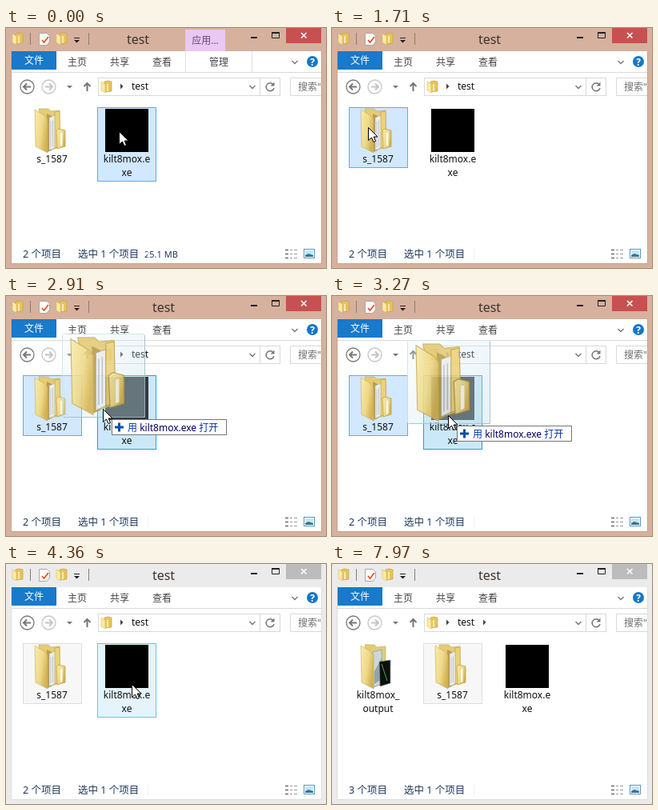
Write an HTML page that moves like this. It is 400 px wide and 300 px high and loops after 8000 ms.

```html
<!DOCTYPE html>
<html lang="zh">
<head>
<meta charset="utf-8">
<title>Drag and drop</title>
<style>
html, body { margin: 0; width: 100%; height: 100%; overflow: hidden; background: #fff; }
svg { display: block; width: 100vw; height: 100vh; }
text { font: 12px "Noto Sans", "Noto Sans CJK SC", "Noto Sans CJK", sans-serif; fill: #111; }
.mid { text-anchor: middle; }
.title { font-size: 16px; fill: #3c3430; }
.tab { fill: #444; }
.status { font-size: 12.5px; fill: #1e395b; }
.line { fill: none; stroke: #777; }
.edge { fill: none; stroke: #d9d9d9; }

/* All parts share one 8 s clock and change in hard steps */
.a { animation: 8s step-end infinite; }
.frame { animation-name: frame; }
.rim { animation-name: rim; fill: none; }
.close { animation-name: close; }
.heading { animation-name: heading; }
.context { animation-name: context; }
.two { animation-name: two; }
.three { animation-name: three; }
.crumb { animation-name: crumb; }
.moved { animation-name: moved; }
.source-box { animation-name: source-box; }
.app-box { animation-name: app-box; }
.app-icon { animation-name: app-icon; }
.empty { animation-name: empty; }
.filled { animation-name: filled; }
.pointer { animation-name: pointer; }
.ghost { animation-name: ghost; }
.tip { animation-name: tip; }
.ring { animation-name: ring; }
.spin { animation-name: spin; transform-origin: 14.5px .5px; }

@keyframes frame { 0% { fill: #d6b19e } 50%, 100% { fill: #ebebeb } }
@keyframes rim { 0% { stroke: #c7a391 } 50%, 100% { stroke: #dedede } }
@keyframes close { 0% { fill: #c75050 } 50%, 100% { fill: #bcbcbc } }
@keyframes heading { 0% { transform: translateX(-32px) } 12.125%, 100% { transform: none } }
@keyframes context { 0% { opacity: 1 } 12.125%, 100% { opacity: 0 } }
@keyframes two { 0% { opacity: 1 } 70.125%, 100% { opacity: 0 } }
@keyframes three { 0% { opacity: 0 } 70.125%, 100% { opacity: 1 } }
@keyframes crumb { 0% { opacity: 0 } 74.75%, 100% { opacity: 1 } }
@keyframes moved { 0% { transform: none } 70.125%, 100% { transform: translateX(93px) } }
@keyframes source-box {
  0% { fill: #fff; stroke: #fff }
  4.5% { fill: #e5f3fb; stroke: #70c0e7 }
  10.625% { fill: #d1e8ff; stroke: #66a7e8 }
  50% { fill: #f7f7f7; stroke: #dedede }
  71.625% { fill: #d1e8ff; stroke: #66a7e8 }
  96.625%, 100% { fill: #f7f7f7; stroke: #dedede }
}
@keyframes app-box {
  0% { fill: #d1e8ff; stroke: #66a7e8 }
  10.625% { fill: #fff; stroke: #fff }
  36.375% { fill: #cbe8f9; stroke: #26a0da }
  50% { fill: #e5f3fb; stroke: #70c0e7 }
  70.125%, 100% { fill: #fff; stroke: #fff }
}
@keyframes app-icon { 0% { opacity: 1 } 36.375% { opacity: .75 } 50%, 100% { opacity: 1 } }
@keyframes empty { 0% { opacity: 0 } 70.125% { opacity: 1 } 96.625%, 100% { opacity: 0 } }
@keyframes filled { 0% { opacity: 0 } 96.625%, 100% { opacity: 1 } }
@keyframes pointer {
  0% { transform: translate(141px, 129px); animation-timing-function: steps(5) }
  7.5% { transform: translate(45px, 124px) }
  21.375% { transform: translate(45px, 124px); animation-timing-function: steps(6) }
  30.375% { transform: translate(79px, 130px); animation-timing-function: steps(4) }
  36.375% { transform: translate(121px, 141px); animation-timing-function: steps(3) }
  40.875% { transform: translate(145px, 149px); animation-timing-function: steps(3) }
  45.375% { transform: translate(157px, 150px) }
  96.625% { transform: translate(97px, 146px) }
  98.125% { transform: translate(15px, 136px) }
  99.625%, 100% { transform: translate(-40px, 136px) }
}
@keyframes ghost { 0% { opacity: 0 } 22.875% { opacity: .35 } 24.375% { opacity: .7 } 25.875% { opacity: .9 } 50%, 100% { opacity: 0 } }
@keyframes tip { 0% { opacity: 0 } 36.375% { opacity: 1 } 50%, 100% { opacity: 0 } }
@keyframes ring { 0% { opacity: 0 } 50% { opacity: 1 } 54.5%, 100% { opacity: 0 } }
@keyframes spin { 0% { transform: none } 53%, 100% { transform: rotate(120deg) } }
</style>
</head>
<body>
<svg viewBox="0 0 400 300">
  <defs>
    <linearGradient id="cover" x2="1" y2=".5">
      <stop stop-color="#f8ebae"/><stop offset=".6" stop-color="#eed988"/><stop offset="1" stop-color="#d3b354"/>
    </linearGradient>
    <linearGradient id="glass" x2="1" y2="1">
      <stop stop-color="#f0f7fb" stop-opacity=".3"/><stop offset="1" stop-color="#b8dae8" stop-opacity=".42"/>
    </linearGradient>
    <path id="back" d="M5 0 17 0 20 3 31 2 31 48 15 53Z" fill="#e3cb78" stroke="#c3a64e" stroke-width=".6"/>
    <path id="front" d="M0 1 13 9 16 13 16 55 1 47Z" fill="url(#cover)" stroke="#c8ab52" stroke-width=".6"/>
    <g id="folder">
      <use href="#back"/>
      <path d="M15 6 21 9 21 52 16 54Z" fill="#b99c4a"/>
      <path d="M18 11 26 8 26 48 18 52Z" fill="#eceeee" stroke="#a9a9a0" stroke-width=".5"/>
      <path d="M20 15V48M22.500 14V47" stroke="#b4bcc4" stroke-width=".8"/>
      <path d="M25 4 31 3 32 46 25 49Z" fill="#ead27c" stroke="#bb9d45" stroke-width=".6"/>
      <path d="M27 27 30 25 38 27 38 47 28 50Z" fill="url(#cover)" stroke="#bb9a3e" stroke-width=".7"/>
      <path d="M32 30 34.500 29.500 34.500 46 32 47Z" fill="#fffbe8"/>
      <use href="#front"/>
    </g>
    <g id="mini">
      <path d="M4 1 8 0 13 1 13 13 4 14Z" fill="#e6c45c" stroke="#c9a23d" stroke-width=".7"/>
      <path d="M0 1 5 4 5 15 0 12Z" fill="#fbeaa4" stroke="#d6b450" stroke-width=".5"/>
      <path d="M8 4V13" stroke="#fff6d0" stroke-width="1.5"/>
    </g>
    <path id="down" d="M-3.5 -2 0 1.500 3.500 -2" fill="none" stroke="#777" stroke-width="1.4"/>
    <path id="right" d="M0 -3.500 3.500 0 0 3.500Z" fill="#444"/>
  </defs>

  <!-- Window frame and title bar -->
  <rect class="a frame" width="400" height="300"/>
  <rect x="7" y="29" width="387" height="265" fill="#fff"/>
  <path class="a rim" d="M6.500 29V294.500H394.500V29"/>
  <use href="#mini" x="8" y="6"/>
  <path d="M30.500 6V21M103.500 6V21" stroke="#8b7b72"/>
  <path d="M41.500 6.500H51L54.500 10V17L51 21.500H41.500Z" fill="#fff" stroke="#a6a6a6"/>
  <path d="M45 15 47.500 18 53 11" fill="none" stroke="#e0552b" stroke-width="1.800"/>
  <use href="#mini" x="63" y="6"/>
  <path d="M85 12.500H92" stroke="#222"/>
  <path d="M85 15H92L88.500 18.500Z" fill="#222"/>
  <g class="a context">
    <rect x="224" y="2" width="50" height="27" fill="#e9c8f3"/>
    <text class="mid" x="249" y="20" style="fill:#6a4a75">应用...</text>
    <path d="M224.500 29V55M307.500 29V55" stroke="#ead9ef"/>
    <text class="mid tab" x="266" y="47">管理</text>
  </g>
  <text class="mid title a heading" x="197" y="20">test</text>
  <rect x="306" y="11" width="8" height="2" fill="#222"/>
  <path d="M332.500 6V12.500H341.500V6" fill="none" stroke="#222"/>
  <rect x="332" y="5" width="10" height="2" fill="#222"/>
  <rect class="a close" x="350" width="44" height="19"/>
  <path d="M369 6 375.500 12.500M375.500 6 369 12.500" stroke="#fff" stroke-width="1.600"/>

  <!-- Ribbon -->
  <rect x="7" y="29" width="56" height="23" fill="#1979ca"/>
  <text class="mid" x="35" y="45" style="fill:#fff">文件</text>
  <text class="tab" x="77" y="47">主页</text>
  <text class="tab" x="130" y="47">共享</text>
  <text class="tab" x="183" y="47">查看</text>
  <path d="M7 55.500H394" class="edge"/>
  <use href="#down" x="361" y="43"/>
  <circle cx="383" cy="42" r="7" fill="#1577c9"/>
  <text class="mid" x="383" y="46.500" style="fill:#fff;font-weight:700">?</text>

  <!-- Address bar -->
  <g class="line" stroke-width="1.300">
    <circle cx="26.500" cy="73.500" r="8.500"/>
    <path d="M31 73.500H22.500M26 69.500 22 73.500 26 77.500" stroke-width="2"/>
    <path d="M101.500 79V69M97.500 73 101.500 69 105.500 73" stroke-width="2"/>
    <g style="stroke:#c4c4c4">
      <circle cx="53.500" cy="73.500" r="8.500"/>
      <path d="M49 73.500H57.500M54 69.500 58 73.500 54 77.500" stroke-width="2"/>
    </g>
  </g>
  <path d="M76 72H83L79.500 75.500Z" fill="#777"/>
  <rect class="edge" x="115.500" y="62.500" width="227" height="22"/>
  <use href="#mini" x="119" y="66"/>
  <use href="#right" x="143" y="73"/>
  <text x="157" y="77">test</text>
  <use class="a crumb" href="#right" x="189" y="73"/>
  <use href="#down" x="308" y="74"/>
  <path class="edge" d="M317.500 63V84"/>
  <path class="line" d="M334 70.500A5 5 0 1 0 335 75" stroke-width="1.500"/>
  <path d="M335.500 67.500V72.500H330.500Z" fill="#777"/>
  <path class="edge" d="M394 62.500H355.500V84.500H394"/>
  <text x="365" y="78" style="fill:#6d6d6d">搜索"</text>

  <!-- Output folder -->
  <g class="a empty">
    <use href="#back" x="36" y="101"/>
    <path d="M51 109 57 112 57 153 52 155Z" fill="#b99c4a"/>
    <path d="M54 114 65 109 66 149 54 154Z" fill="#ececec" stroke="#b4b4b4" stroke-width=".7"/>
    <path d="M61 114 74 111 74 149 62 153Z" fill="#fff" stroke="#b4b4b4" stroke-width=".7"/>
    <use href="#front" x="36" y="101"/>
  </g>
  <g class="a filled">
    <use href="#back" x="36" y="101"/>
    <path d="M51 110 62 107 63 149 52 154Z" fill="#c9d8d9" stroke="#8c9a9b" stroke-width=".7"/>
    <path d="M53 134 62 118 62 144 53 150Z" fill="#8fa5a8"/>
    <path d="M59 122 73 120 73 149 60 153Z" fill="#0c100d" stroke="#999" stroke-width=".7"/>
    <path d="M62 125 69 146" stroke="#5b9d50"/>
    <use href="#front" x="36" y="101"/>
  </g>
  <g class="a three">
    <text class="mid" x="57.500" y="168">kilt8mox_</text>
    <text class="mid" x="57.500" y="185">output</text>
  </g>

  <!-- Dragged folder -->
  <g class="a moved">
    <rect class="a source-box" x="21.500" y="99.500" width="73" height="75"/>
    <use href="#folder" x="36" y="101"/>
    <text class="mid" x="57.500" y="168">s_1587</text>
  </g>

  <!-- Application -->
  <g class="a moved">
    <rect class="a app-box" x="114.500" y="99.500" width="73" height="92"/>
    <rect class="a app-icon" x="124" y="101" width="54" height="54"/>
    <text class="mid" x="151" y="168">kilt8mox.e</text>
    <text class="mid" x="151" y="185">xe</text>
  </g>

  <!-- Status bar -->
  <text class="status a two" x="21" y="287">2 个项目</text>
  <text class="status a three" x="21" y="287">3 个项目</text>
  <text class="status" x="90" y="287">选中 1 个项目</text>
  <text class="status a context" x="173" y="287" style="font-size:11px">25.1 MB</text>
  <path d="M177.500 276V289" stroke="#f0f0f0"/>
  <path d="M349 277.500H353M349 282.500H353M349 287.500H353" stroke="#888" stroke-width="2"/>
  <path d="M355 277.500H358M360 277.500H364M355 282.500H358M360 282.500H364M355 287.500H358M360 287.500H364" stroke="#999"/>
  <rect x="372.500" y="276.500" width="13" height="11" fill="#fff" stroke="#5c93b8"/>
  <rect x="374" y="278" width="10" height="8" fill="#c4e6f8"/>
  <path d="M374 286V284L378 282 384 284V286Z" fill="#38748f"/>

  <!-- Pointer with everything it carries -->
  <g class="a pointer">
    <g class="a ghost">
      <rect x="-50.500" y="-93.500" width="103" height="104" rx="2" fill="url(#glass)" stroke="#cfe3ea"/>
      <path d="M52.500 -92V10.500H-49" fill="none" stroke="#a3bfc8"/>
      <use href="#folder" transform="translate(-40 -89) scale(1.75)"/>
    </g>
    <g class="a tip">
      <rect x="11.500" y="13.500" width="143" height="19" fill="#fff" stroke="#767676"/>
      <path d="M20.500 17.500V28.500M15 23H26" stroke="#0a4fa3" stroke-width="3"/>
      <text x="31" y="28" style="fill:#0033a8">用 <tspan fill="#000060">kilt8mox.exe</tspan> 打开</text>
    </g>
    <path d="M.5 .5V16.500L4.500 13 7 18.500 9.500 17.500 7.200 12H12Z" fill="#fff" stroke="#000"/>
    <g class="a ring">
      <circle cx="14.500" cy=".5" r="6.500" fill="none" stroke="#3f9fdf" stroke-width="3.500"/>
      <path class="a spin" d="M14.500 -6A6.500 6.500 0 0 1 21 .5" fill="none" stroke="#b5e6ff" stroke-width="3"/>
    </g>
  </g>
</svg>
</body>
</html>
```
